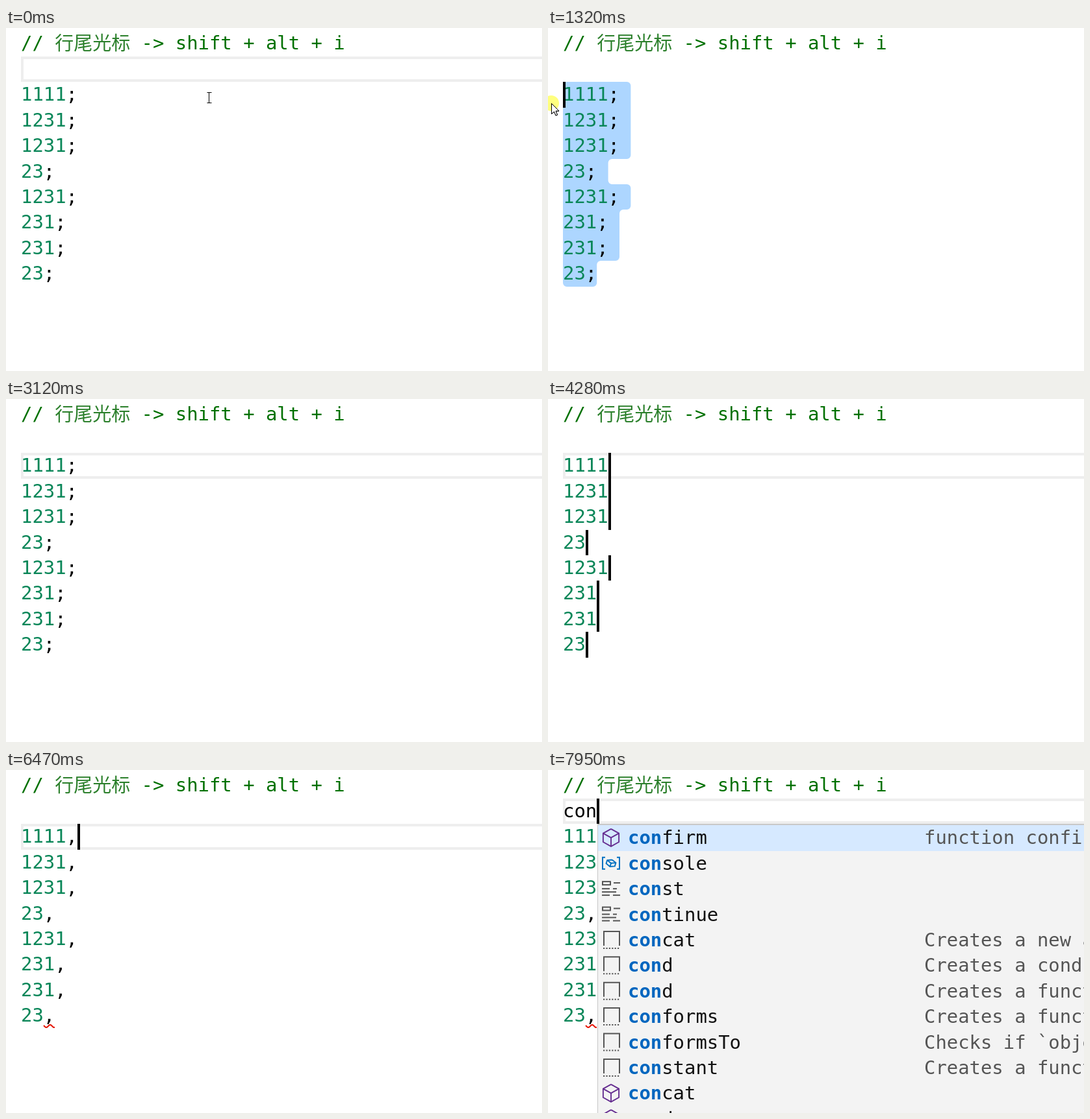
Recreate the animation shown at these times as an HTML page with a canvas. Size 825 by 529 pixels, loop 8000 ms.

```html
<!DOCTYPE html>
<html lang="zh">
<head>
<meta charset="utf-8">
<style>
  html, body { margin: 0; width: 100%; height: 100%; overflow: hidden; background: #fff; }
  canvas { display: block; }
</style>
</head>
<body>
<canvas id="stage" width="825" height="529"></canvas>
<script>
const ctx = document.getElementById("stage").getContext("2d");
const LOOP = 8000, LEFT = 23, CHAR = 17.4, LINE = 39.4;
const MONO = '28.9px "DejaVu Sans Mono", monospace';
const CJK = '300 29px "Noto Sans CJK SC", "Noto Sans CJK", sans-serif';
const numbers = ["1111", "1231", "1231", "23", "1231", "231", "231", "23"];
const FIRST = 2, LAST = 9;

// Main moments of the story
const CLICK = 860, LAND = 940, DRAG = 1040, DRAG_END = 1320, LEAVE = 1790;
const SPLIT = 2660, ERASE = 3290, COMMA = 4590, ESCAPE = 6470, UP = 6850;
const TYPE = 7710, POPUP = 7780, TYPED = 7950;
// Every action restarts the caret blink.
const actions = [-660, LAND, DRAG_END, SPLIT, ERASE, COMMA, ESCAPE, UP, TYPE, POPUP, TYPED];

const common = [
  ["method", "confirm", "function confirm"],
  ["variable", "console"],
  ["keyword", "const"],
  ["keyword", "continue"],
  ["snippet", "concat", "Creates a new array"]
];
const snippet = detail => label => ["snippet", label, detail];
const suggestions = {
  co: [
    ...common,
    ...["comment block", "comment-section", "comment-section-footer",
      "comment-section-header", "comment-subsection"].map(snippet("Creates a comment")),
    ["snippet", "concat", "just a word (value)"]
  ],
  con: [
    ...common,
    snippet("Creates a cond function")("cond"),
    ...["cond", "conforms"].map(snippet("Creates a function")),
    snippet("Checks if `object`")("conformsTo"),
    snippet("Creates a function")("constant"),
    ["method", "concat"],
    ["method", "cond"]
  ]
};

const colX = col => LEFT + CHAR * col;
const rowY = row => Math.round(4.5 + LINE * row);
const smooth = k => k * k * (3 - 2 * k);
const mix = (a, b, k) => a + (b - a) * k;

function text(str, x, y, color, font = MONO) {
  ctx.font = font;
  ctx.fillStyle = color;
  ctx.fillText(str, x, y);
}

function line(color, width, ...points) {
  ctx.strokeStyle = color;
  ctx.lineWidth = width;
  ctx.beginPath();
  for (const point of points) ctx.lineTo(...point);
  ctx.stroke();
}

function pointerAt(t) {
  if (t < CLICK) {
    const k = smooth(Math.floor((t + 9) / 79) / 11);
    return [mix(312, 207, k), mix(107, 384, k)];
  }
  if (t < DRAG) return [205, 384];
  if (t <= DRAG_END) {
    const k = smooth((Math.floor((t - DRAG) / 70) + 0.3) / 4.3);
    return [mix(205, 5, k), mix(384, 116, k)];
  }
  const step = Math.min(3, Math.floor((t - DRAG_END) / 76));
  return [5 - step, 116 - 13 * step];
}

function focusAt(t) {
  const [x, y] = pointerAt(Math.min(t, DRAG_END));
  const row = Math.min(LAST, Math.floor((y - 4.5) / LINE));
  const col = Math.round((x - LEFT) / CHAR);
  return [row, Math.max(0, Math.min(col, numbers[row - FIRST].length + 1))];
}

function caretsAt(t, word) {
  const sinceAction = t - actions.filter(a => a <= t).pop();
  if (Math.floor((sinceAction + 50) / 510) % 2) return [];
  if (t < LAND || t >= UP) return [[1, word.length]];
  if (t < SPLIT) return [focusAt(t)];
  const extra = t >= ERASE && t < COMMA ? 0 : 1;
  const ends = numbers.map((n, i) => [i + FIRST, n.length + extra]);
  return t < ESCAPE ? ends : ends.slice(0, 1);
}

function drawSelection([row, col]) {
  const points = [], startX = colX(col);
  for (let r = row; r <= LAST; r++) {
    const right = colX(numbers[r - FIRST].length + (r < LAST ? 2 : 1));
    points.push([right, rowY(r)], [right, rowY(r + 1)]);
  }
  points.push([LEFT, rowY(LAST + 1)]);
  if (col) points.push([LEFT, rowY(row + 1)], [startX, rowY(row + 1)]);
  points.push([startX, rowY(row)]);
  ctx.fillStyle = "#add6ff";
  ctx.beginPath();
  ctx.moveTo(startX + 8, rowY(row));
  points.forEach((p, i) => ctx.arcTo(...p, ...points[(i + 1) % points.length], 6));
  ctx.fill();
}

function drawCode(t, word) {
  const green = "#007000", tail = t < ERASE ? ";" : t < COMMA ? "" : ",";
  text("//", LEFT, 33, green);
  text("行尾光标", colX(3), 33.5, "#2c802c", CJK);
  text("-> shift + alt + i", colX(4) + 4 * 29, 33, green);
  text(word, LEFT, rowY(1) + 29, "#000");
  numbers.forEach((n, i) => {
    const y = rowY(i + FIRST) + 29;
    text(n, LEFT, y, "#098658");
    text(tail, colX(n.length), y, "#000");
  });
  if (t >= COMMA + 320) {
    const wave = Array.from({ length: 18 }, (_, i) => [58 + i, 395 + 2 * Math.cos((i - 4) * Math.PI / 6)]);
    line("#e51400", 2, ...wave);
  }
}

function drawBulb() {
  ctx.strokeStyle = "#ddb100";
  ctx.lineWidth = 2;
  ctx.beginPath();
  ctx.arc(40, 56, 8.7, 2.2, 0.94);
  ctx.closePath();
  ctx.rect(36, 66, 8, 5);
  ctx.stroke();
}

function cube(color, rx, ry) {
  const corner = i => [rx * Math.sin(i * Math.PI / 3), -ry * Math.cos(i * Math.PI / 3)];
  line(color, 1.9, ...[0, 1, 2, 3, 4, 5, 6].map(corner));
  for (const i of [1, 3, 5]) line(color, 1.9, [0, 0], corner(i));
}

// Icons are drawn around their own centre.
const icons = {
  method: () => cube("#652d90", 14, 13.5),
  variable() {
    for (const side of [-1, 1])
      line("#0070c1", 2, [9 * side, -9], [13 * side, -9], [13 * side, 9], [9 * side, 9]);
    ctx.rotate(0.3);
    cube("#0070c1", 8, 5.5);
  },
  keyword() {
    ctx.strokeStyle = "#555";
    ctx.lineWidth = 2;
    ctx.strokeRect(-13, -11, 12, 5);
    line("#555", 2, [4, -9], [14, -9]);
    for (const y of [0, 5, 10]) {
      const gap = y === 5 ? 8 : -2;
      line("#555", 2, [-14, y], [gap, y]);
      if (y !== 5) line("#555", 2, [3, y], [9 + y / 2, y]);
    }
  },
  snippet() {
    line("#555", 2, [-11, 9], [-11, -13], [13, -13], [13, 9]);
    ctx.setLineDash([2.2, 2.2]);
    line("#555", 2, [-12, 13], [14, 13]);
    ctx.setLineDash([]);
  }
};

function drawPopup(word) {
  const n = word.length, left = Math.round(colX(n)) + 1;
  ctx.fillStyle = "#c8c8c8";
  ctx.fillRect(left, 83, 825, 446);
  ctx.fillStyle = "#f3f3f3";
  ctx.fillRect(left + 1, 85, 825, 444);
  ctx.fillStyle = "#d6e9ff";
  ctx.fillRect(left + 1, 85, 825, 40);
  suggestions[word].forEach(([icon, label, detail = ""], i) => {
    const y = 85.3 + LINE * i, x = left + 47;
    ctx.save();
    ctx.translate(left + 21, y + 19);
    icons[icon]();
    ctx.restore();
    text(label.slice(0, n), x, y + 29, "#0066bf", "bold " + MONO);
    text(label.slice(n), x + n * CHAR, y + 29, "#111");
    text(detail, left + 503, y + 29, "#555");
  });
}

function drawPointer(t) {
  const [x, y] = pointerAt(t);
  if (t >= CLICK && t < DRAG_END + 150) {
    ctx.fillStyle = "rgba(255,255,0,.5)";
    ctx.beginPath();
    ctx.arc(x, y, 12, 0, 7);
    ctx.fill();
  }
  ctx.save();
  ctx.translate(Math.round(x) + 0.5, Math.round(y) + 0.5);
  if (x > LEFT) {
    if (t >= CLICK) ctx.translate(2, 0);
    line("#000", 1, [0, -8], [0, 8]);
    for (const end of [-8, 8]) line("#000", 1, [-3, end], [4, end]);
  } else {
    ctx.fillStyle = "#fff";
    line("#000", 1, [0, 0], [0, 16], [4, 12.5], [6.5, 18.5], [9, 17.5], [6.5, 11.5], [11.5, 11.5], [0, 0]);
    ctx.fill();
    ctx.stroke();
  }
  ctx.restore();
}

function draw(t) {
  ctx.fillStyle = "#fff";
  ctx.fillRect(0, 0, 825, 529);
  const word = "con".slice(0, [TYPE, POPUP, TYPED].filter(at => t >= at).length);

  if (t >= DRAG + 70 && t < SPLIT) {
    drawSelection(focusAt(t));
  } else {
    const row = t < LAND || t >= UP ? 1 : t < SPLIT ? LAST : FIRST;
    ctx.strokeStyle = "#eee";
    ctx.lineWidth = 4;
    ctx.strokeRect(LEFT + 2, rowY(row) + 2, 900, rowY(row + 1) - rowY(row) - 4);
  }
  drawCode(t, word);
  if (t >= 1550 && t < SPLIT + 230) drawBulb();
  ctx.fillStyle = "#000";
  for (const [row, col] of caretsAt(t, word))
    ctx.fillRect(Math.round(colX(col)), rowY(row), 4, rowY(row + 1) - rowY(row));
  if (t >= POPUP) drawPopup(word);
  if (t < LEAVE) drawPointer(t);
}

const start = performance.now();
function tick() {
  draw((performance.now() - start) % LOOP);
  requestAnimationFrame(tick);
}
tick();
</script>
</body>
</html>
```
